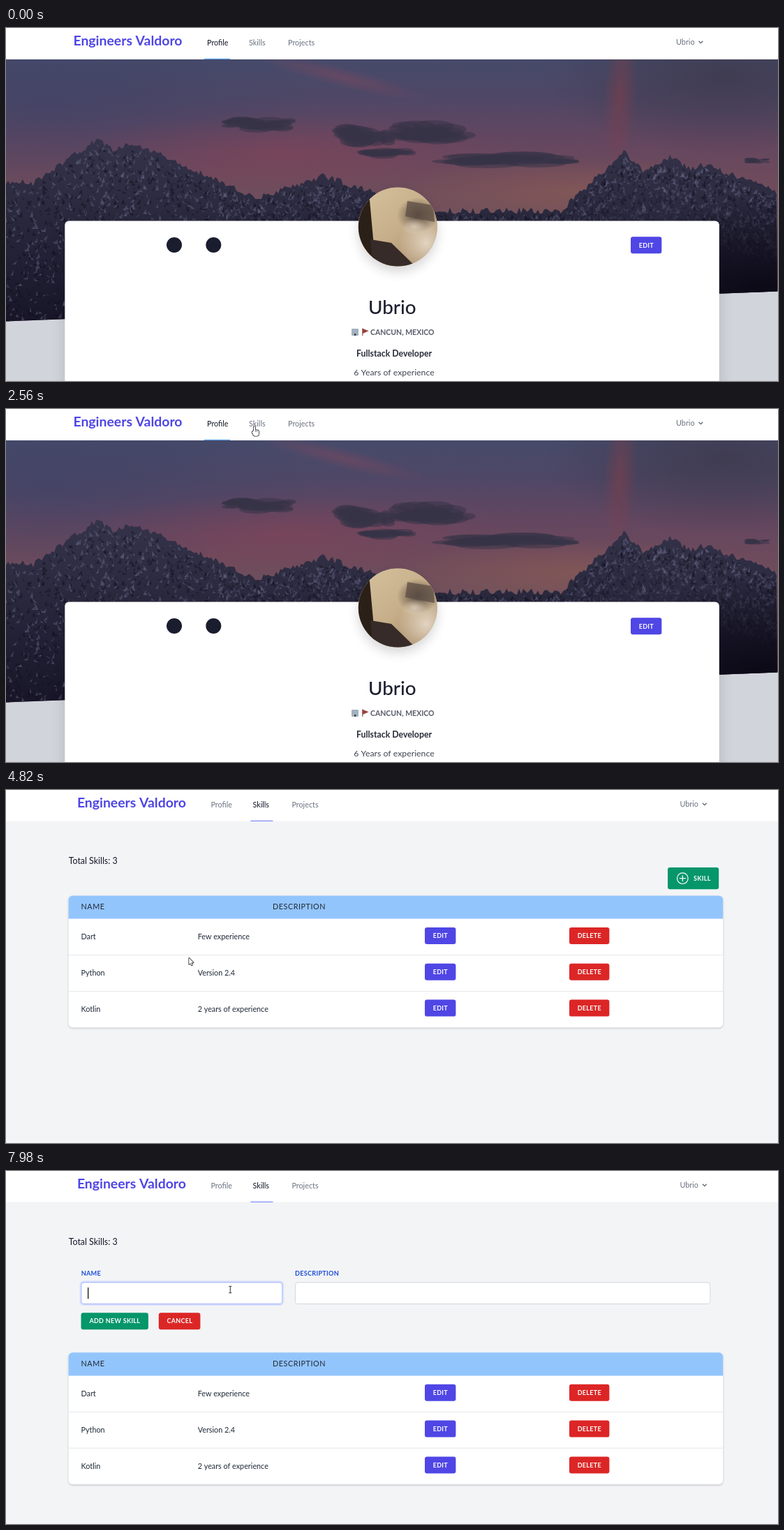
An HTML page with a canvas for the animation above (8 s loop, 1106 by 506 pixels).

```html
<!DOCTYPE html>
<html lang="en">
<head>
<meta charset="utf-8">
<title>Skills dashboard</title>
<style>
html, body { margin: 0; width: 100%; height: 100%; overflow: hidden; background: #f3f4f6; }
canvas { display: block; }
</style>
</head>
<body>
<canvas id="stage" width="1106" height="506"></canvas>
<script>
const W = 1106, H = 506, LOOP = 8000, HOLD = 67;
const SKILLS_AT = 2625, FORM_AT = 6670, FOCUS_AT = 7920;
const INDIGO = '#4f46e5', GREEN = '#059669', RED = '#dc2626', BLUE = '#1d4ed8';
const INK = '#1f2937', GREY = '#6b7280';
const BRAND = 'Engineers Valdoro', USER = 'Ubrio';
const ROW = 51.8;
const stage = document.getElementById('stage').getContext('2d');
let ctx = stage;

// ---------- helpers ----------
function text(str, x, y, size, color = INK, weight = 400, spacing = 0, align = 'left') {
  ctx.font = `${weight} ${size}px Lato, "Open Sans", sans-serif`;
  ctx.letterSpacing = spacing + 'px';
  ctx.textAlign = align;
  ctx.fillStyle = color;
  ctx.fillText(str, x, y);
}

function box(x, y, w, h, r, fill) {
  ctx.beginPath();
  ctx.roundRect(x, y, w, h, r);
  ctx.fillStyle = fill;
  ctx.fill();
}

function poly(points, fill) {
  ctx.beginPath();
  points.forEach(p => ctx.lineTo(...p));
  ctx.closePath();
  ctx.fillStyle = fill;
  ctx.fill();
}

function oval(x, y, rx, ry, fill) {
  ctx.beginPath();
  ctx.ellipse(x, y, rx, ry, 0, 0, Math.PI * 2);
  ctx.fillStyle = fill;
  ctx.fill();
}

function line(color, width, ...points) {
  ctx.beginPath();
  points.forEach(p => ctx.lineTo(...p));
  ctx.strokeStyle = color;
  ctx.lineWidth = width;
  ctx.stroke();
}

function raised(alpha, blur, dy, paint) {
  ctx.save();
  ctx.shadowColor = `rgba(0,0,0,${alpha})`;
  ctx.shadowBlur = blur;
  ctx.shadowOffsetY = dy;
  paint();
  ctx.restore();
}

function button(x, y, w, color, label) {
  box(x, y, w, 24, 3.2, color);
  text(label, x + w / 2 + .15, y + 15.2, 9, '#fff', 700, .3, 'center');
}

function gradient(x0, y0, x1, y1, ...colors) {
  const g = ctx.createLinearGradient(x0, y0, x1, y1);
  colors.forEach((c, i) => g.addColorStop(i / (colors.length - 1), c));
  return g;
}

function glow(x, y, rx, ry, rgb, alpha, angle = 0) {
  ctx.save();
  ctx.translate(x, y);
  ctx.rotate(angle);
  ctx.scale(rx, ry);
  const g = ctx.createRadialGradient(0, 0, 0, 0, 0, 1);
  g.addColorStop(0, `rgba(${rgb},${alpha})`);
  g.addColorStop(1, `rgba(${rgb},0)`);
  ctx.fillStyle = g;
  ctx.fillRect(-1, -1, 2, 2);
  ctx.restore();
}

function randomizer(seed) {
  return () => (seed = (seed * 16807) % 2147483647) / 2147483647;
}

function layer(paint) {
  const canvas = document.createElement('canvas');
  canvas.width = W;
  canvas.height = H;
  ctx = canvas.getContext('2d');
  paint();
  ctx = stage;
  return canvas;
}

// ---------- header ----------
function header(dx, active) {
  box(0, 0, W, active ? 44.5 : 45, 0, '#fff');
  text(BRAND, 96.5 + dx, 25, 19.4, INDIGO, 700);
  ['Profile', 'Skills', 'Projects'].forEach((name, i) =>
    text(name, [288, 348, 404][i] + dx, 25, 10.8, i === active ? '#111827' : GREY));
  const [x, w] = active ? [345, 32] : [284, 37];
  box(x + dx, 43.7, w, 1.3, 0, active ? '#818cf8' : '#60a5fa');
  text(USER, 960 + dx, 24.3, 10.8, GREY);
  line('#5b6370', 1.3, [992.5 + dx, 18.8], [995.4 + dx, 21.7], [998.3 + dx, 18.8]);
}

// ---------- profile page ----------
function sky() {
  box(0, 44, W, 380, 0, gradient(0, 45, 0, 265, '#464a6a', '#4f4766', '#624660', '#6d4a5c', '#6f505c'));
  glow(60, 110, 380, 130, '60,66,102', .6);
  glow(400, 180, 320, 55, '134,66,88', .5);
  glow(480, 70, 130, 15, '142,72,92', .4, .25);
  glow(820, 235, 280, 50, '152,98,80', .45);
  glow(1030, 70, 260, 110, '60,56,74', .75);
  glow(880, 95, 24, 115, '138,62,70', .5, .06);
}

function clouds(rand) {
  const banks = [[362, 138, 54, 13], [512, 154, 46, 20], [612, 149, 66, 19],
    [545, 179, 44, 9], [715, 189, 108, 13], [1076, 190, 19, 5]];
  for (const [x, y, w, h] of banks) {
    for (let i = 0; i < 24; i++) {
      const u = rand() * 2 - 1, size = .2 + .25 * (1 - u * u);
      oval(x + u * w * .8, y + (rand() - .5) * h, w * size, h * size, 'rgba(56,51,72,.55)');
    }
  }
}

// The skyline is the highest of a few triangular peaks: centre, height, half width.
const PEAKS = [[20, 42, 200], [132, 103, 150], [180, 98, 220], [455, 50, 150],
  [885, 84, 90], [950, 77, 140], [1000, 66, 180]];
const ridgeY = x => 261 - Math.max(0, ...PEAKS.map(([c, h, w]) => h * (1 - Math.abs(x - c) / w)));

function mountains(rand) {
  const edge = [[0, H]];
  for (let x = 0; x <= W; x += 3) edge.push([x, ridgeY(x) + (rand() - .4) * 9]);
  edge.push([W, H]);
  poly(edge, gradient(0, 160, 0, 420, '#34334a', '#2c2b40', '#222034', '#171527'));
  ctx.save();
  ctx.clip();
  // snow and rock streaks, thinning out towards the right
  for (let i = 0; i < 5200; i++) {
    const x = rand() * W, depth = rand(), snow = rand() < .5;
    const y = ridgeY(x) + 4 + depth * (x < 300 ? 230 : 100);
    const length = 2 + rand() * 7, slant = (rand() - .5) * 10, thick = .8 + rand() * 2.2;
    const alpha = (snow ? .4 : .5) * (x < 300 ? 1 : 1 - depth * .7);
    poly([[x, y], [x + slant + thick, y + length], [x + slant - thick, y + length]],
      `rgba(${snow ? '112,112,146' : '18,17,30'},${alpha})`);
  }
  glow(1080, 380, 200, 140, '10,8,20', .95);
  ctx.restore();
}

function avatar() {
  const x = 561.3, y = 285, r = 56.5;
  raised(.16, 16, 8, () => oval(x, y, r, r, '#cdb593'));
  ctx.save();
  ctx.beginPath();
  ctx.arc(x, y, r, 0, 7);
  ctx.clip();
  box(x - r, y - r, 2 * r, 2 * r, 0, gradient(520, 235, 610, 340, '#d3bf9b', '#c6ae89', '#a58868'));
  poly([[500, 225], [519, 225], [530, 345], [500, 345]], '#2b2018');
  glow(602, 308, 40, 42, '226,212,192', 1);
  glow(590, 268, 30, 25, '88,74,64', 1);
  poly([[572, 270], [575, 248], [612, 254], [614, 278]], 'rgba(92,78,68,.75)');
  glow(585, 285, 18, 12, '218,202,182', .9);
  poly([[522, 303], [552, 308], [590, 345], [526, 345]], '#362b28');
  ctx.restore();
}

function profilePage() {
  const rand = randomizer(2024);
  box(0, 0, W, H, 0, '#d1d5db');
  ctx.save();
  ctx.beginPath();
  [[0, 44], [W, 44], [W, 377.5], [0, 420.5]].forEach(p => ctx.lineTo(...p));
  ctx.clip();
  sky();
  clouds(rand);
  mountains(rand);
  ctx.restore();
  header(0, 0);
  raised(.14, 20, 8, () => box(84.3, 276.5, 937.5, 260, 6, '#fff'));
  avatar();
  for (const x of [241, 297.3]) oval(x, 311, 11, 11, '#1a1d2e');
  button(895, 299.3, 44.3, INDIGO, 'EDIT');
  text(USER, 553.3, 410, 27.8, '#1e2030', 500, 0, 'center');
  box(495, 431, 10, 10, 1, '#a3b1bf');
  box(499, 438, 2.3, 3, 0, '#39404a');
  line('#765d52', 1.2, [510.8, 430.5], [510.8, 441]);
  poly([[511, 430.8], [519.6, 434.3], [511, 438]], '#9e4038');
  text('CANCUN, MEXICO', 522, 439.7, 10.5, '#585b68', 700);
  text('Fullstack Developer', 556, 471, 12.3, '#292c38', 700, 0, 'center');
  text('6 Years of experience', 556, 498, 12.3, '#414554', 400, 0, 'center');
}

// ---------- skills pages ----------
function table(top) {
  raised(.2, 3, 1.2, () => box(89.5, top, 937.7, 189, 6, '#fff'));
  box(89.5, top, 937.7, 33.2, [6, 6, 0, 0], '#93c5fd');
  text('NAME', 107.5, top + 20, 10.8, INK, 400, .54);
  text('DESCRIPTION', 382, top + 20, 10.8, INK, 400, .54);
  const skills = [['Dart', 'Few experience'], ['Python', 'Version 2.4'], ['Kotlin', '2 years of experience']];
  skills.forEach(([name, about], i) => {
    const y = top + 33.2 + i * ROW;
    if (i) line('#e5e7eb', 1, [89.5, y + .3], [1027.2, y + .3]);
    text(name, 107.5, y + 29.5, 10.8);
    text(about, 274.7, y + 29.5, 10.8);
    button(600, y + 12.4, 44.4, INDIGO, 'EDIT');
    button(807, y + 12.4, 57.4, RED, 'DELETE');
  });
}

function skillsFrame() {
  box(0, 0, W, H, 0, '#f3f4f6');
  header(5.4, 1);
  text('Total Skills: 3', 89.7, 106, 12.4, '#111827');
}

function listPage() {
  skillsFrame();
  box(948, 111, 73.2, 31.3, 3.2, GREEN);
  ctx.beginPath();
  ctx.arc(969.3, 126.7, 7.8, 0, 7);
  ctx.strokeStyle = '#fff';
  ctx.lineWidth = 1.2;
  ctx.stroke();
  line('#fff', 1.2, [964.8, 126.7], [973.8, 126.7]);
  line('#fff', 1.2, [969.3, 122.2], [969.3, 131.2]);
  text('SKILL', 985, 129.5, 9, '#fff', 700, .3);
  table(151.4);
}

function input(x, w, focus = 0) {
  ctx.globalAlpha = focus;
  box(x - 2, 157.3, w + 4, 35.7, 6, '#d9e0fd');
  ctx.globalAlpha = 1;
  box(x, 159.3, w, 31.7, 4.5, focus ? '#a4b4f9' : '#d1d5db');
  box(x + .9, 160.2, w - 1.8, 29.9, 3.7, '#fff');
}

function formPage() {
  skillsFrame();
  text('NAME', 107.7, 150.2, 9.2, BLUE, 700, .23);
  text('DESCRIPTION', 414, 150.2, 9.2, BLUE, 700, .23);
  input(107.5, 288.7);
  input(414, 595.3);
  button(107.5, 203.2, 96.4, GREEN, 'ADD NEW SKILL');
  button(218.8, 203.2, 59.6, RED, 'CANCEL');
  table(260.2);
}

// ---------- pointer ----------
// Each glide starts where the last one ended and bends towards its control point.
const ENTRY = [988, 451];
const GLIDES = [
  { from: 130, to: 670, bend: [700, 250], end: [591, 178] },
  { from: 1000, to: 1210, bend: [582, 173], end: [576, 170] },
  { from: 1360, to: 2100, bend: [404, 55], end: [366, 17] },
  { from: 2170, to: 2440, bend: [360, 22], end: [356, 25] },
  { from: 3020, to: 3710, bend: [70, 360], end: [624, 211] },
  { from: 3840, to: 4600, bend: [300, 85], end: [208, 186] },
  { from: 4680, to: 5440, bend: [370, 360], end: [420, 298] },
  { from: 5510, to: 5720, bend: [470, 302], end: [502, 303] },
  { from: 5920, to: 6610, bend: [800, 170], end: [984, 113] },
  { from: 6880, to: 7720, bend: [560, 175], end: [321.3, 170] },
];

function pointerAt(t) {
  const i = GLIDES.findLastIndex(g => t >= g.from);
  if (i < 0) return null;
  const { from, to, bend, end } = GLIDES[i];
  const start = i ? GLIDES[i - 1].end : ENTRY;
  const u = Math.min(1, Math.floor((t - from) / HOLD + .3) * HOLD / (to - from));
  return [0, 1].map(k => start[k] * (1 - u) ** 2 + 2 * bend[k] * u * (1 - u) + end[k] * u * u);
}

const hits = ([px, py], areas) =>
  areas.some(([x, y, w, h]) => px >= x && px <= x + w && py >= y && py <= y + h);

const skillsLink = x => [x, 8, 35, 37];
const rowButtons = [0, 1, 2].flatMap(i => [[600, 197 + i * ROW, 44, 24], [807, 197 + i * ROW, 57, 24]]);
const PAGES = [
  { from: 0, image: layer(profilePage), links: [skillsLink(344)], fields: [] },
  { from: SKILLS_AT, image: layer(listPage), links: [skillsLink(350), [948, 111, 73, 31], ...rowButtons], fields: [] },
  { from: FORM_AT, image: layer(formPage), links: [], fields: [[108, 159, 288, 32], [414, 159, 595, 32]] },
];

function outline(path) {
  ctx.strokeStyle = '#20222a';
  ctx.lineWidth = 1.6;
  ctx.lineJoin = 'round';
  ctx.stroke(path);
  ctx.fillStyle = '#fff';
  ctx.fill(path);
}

function hand() {
  const path = new Path2D();
  path.roundRect(-1, 0, 2.2, 9, 1);
  path.roundRect(-2, 5.2, 8, 8.6, [2, 2, 3, 3]);
  path.roundRect(-3.6, 7.3, 4, 3, 1.5);
  outline(path);
  for (const x of [1.4, 3.6]) line('#20222a', .6, [x, 5.4], [x, 8]);
}

function beam() {
  line('#30333a', 1, [0, -4.7], [0, 4.7]);
  for (const y of [-4.7, 4.7]) line('#30333a', 1, [-2, y], [2, y]);
}

function drawPointer(pos, page) {
  ctx.save();
  ctx.translate(...pos);
  if (hits(pos, page.links)) hand();
  else if (hits(pos, page.fields)) beam();
  else outline(new Path2D('M.6.8V10L2.6 8.2 4.1 11.5 5.3 11 3.9 7.6H6.9Z'));
  ctx.restore();
}

function draw(now) {
  const t = now % LOOP;
  const page = PAGES.findLast(p => t >= p.from);
  ctx.drawImage(page.image, 0, 0);
  if (t >= FOCUS_AT) {
    input(107.5, 288.7, t < FOCUS_AT + 60 ? .6 : 1);
    box(117, 167, 1.3, 16.3, 0, '#111');
  }
  const pos = pointerAt(t);
  if (pos) drawPointer(pos, page);
}

const begin = performance.now();
function tick() {
  draw(performance.now() - begin);
  requestAnimationFrame(tick);
}
tick();
</script>
</body>
</html>
```
